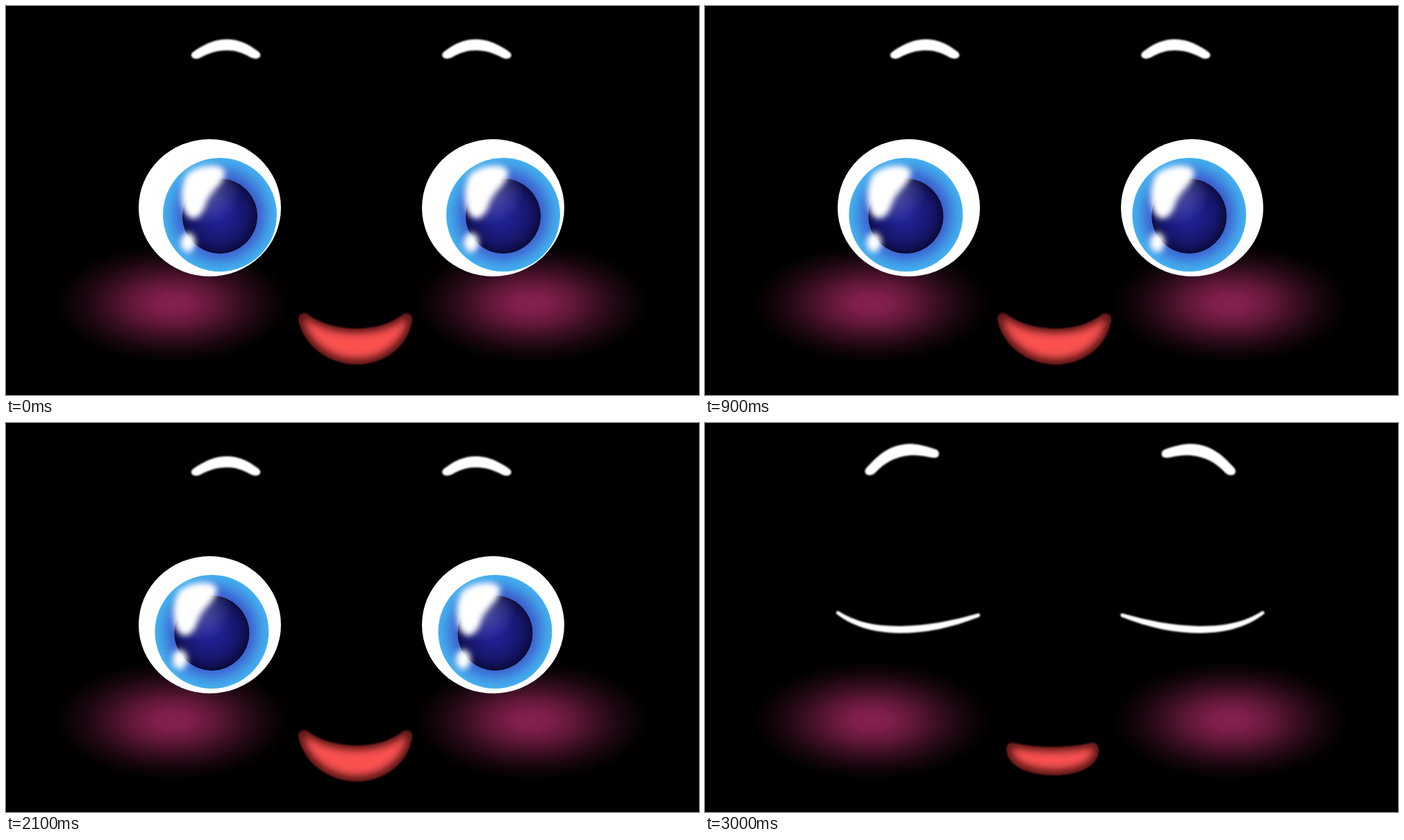
These frames come from a looping animation (998x561 px, 3.1 s). An HTML page:

```html
<!DOCTYPE html>
<html lang="en">
<head>
<meta charset="utf-8">
<title>Blinking face</title>
<style>
  html, body { margin: 0; width: 100%; height: 100%; overflow: hidden; background: #000; }
  svg { display: block; width: 100vw; height: 100vh; }
</style>
</head>
<body>
<svg viewBox="0 0 998 561" preserveAspectRatio="none">
  <defs>
    <radialGradient id="blush">
      <stop offset="0" stop-color="#842050"/>
      <stop offset=".15" stop-color="#7e1e4b"/>
      <stop offset=".35" stop-color="#611739"/>
      <stop offset=".55" stop-color="#3a0e22"/>
      <stop offset=".75" stop-color="#19060f"/>
      <stop offset=".9" stop-color="#080205"/>
      <stop offset="1" stop-color="#000"/>
    </radialGradient>
    <radialGradient id="iris">
      <stop offset=".6" stop-color="#3a55c8"/>
      <stop offset=".72" stop-color="#3d70d6"/>
      <stop offset=".88" stop-color="#419be6"/>
      <stop offset="1" stop-color="#43b0f0"/>
    </radialGradient>
    <radialGradient id="pupil" cx=".48" cy=".48" r=".54">
      <stop offset="0" stop-color="#20229a"/>
      <stop offset=".35" stop-color="#1c1e88"/>
      <stop offset=".7" stop-color="#15166a"/>
      <stop offset=".92" stop-color="#0d0d48"/>
      <stop offset="1" stop-color="#080830"/>
    </radialGradient>
    <radialGradient id="sheen">
      <stop offset="0" stop-color="#fff" stop-opacity=".26"/>
      <stop offset="1" stop-color="#fff" stop-opacity="0"/>
    </radialGradient>
    <filter id="soft" x="-20%" y="-40%" width="140%" height="180%"><feGaussianBlur stdDeviation=".8"/></filter>
    <filter id="glow" x="-40%" y="-40%" width="180%" height="180%"><feGaussianBlur stdDeviation="4"/></filter>
    <filter id="shade" x="-20%" y="-30%" width="140%" height="160%"><feGaussianBlur stdDeviation="6"/></filter>
    <clipPath id="lips"><path class="mouth"/></clipPath>
    <clipPath id="disc"><circle cx="308" cy="303" r="54"/></clipPath>

    <g id="ball">
      <ellipse cx="293.5" cy="291" rx="102.5" ry="99" fill="#fff"/>
      <g id="gaze">
        <circle cx="308" cy="301" r="82" fill="url(#iris)"/>
        <circle cx="308" cy="303" r="53.5" fill="url(#pupil)" stroke="#07071f"/>
        <circle cx="290" cy="268" r="48" fill="url(#sheen)" clip-path="url(#disc)"/>
        <path filter="url(#glow)" fill="#fff" d="M261 242C278 227 312 226 315 239C316 255 296 265 289 282C284 300 276 308 267 306C252 302 247 264 261 242Z"/>
        <ellipse filter="url(#glow)" cx="262" cy="341" rx="10.5" ry="14" fill="#fff"/>
      </g>
    </g>
    <g id="lines" fill="#fff" filter="url(#soft)">
      <path id="brow"/>
      <path id="lid" d="M189 275C188 271 192 270 195 273C220 288 247 293 282 293C322 292 356 285 392 275C396 273 398 278 394 280C355 295 320 303 280 303C240 302 212 293 189 275Z"/>
    </g>
  </defs>

  <rect width="998" height="561"/>
  <ellipse cx="240" cy="429" rx="172" ry="87" fill="url(#blush)"/>
  <ellipse cx="757" cy="429" rx="172" ry="87" fill="url(#blush)"/>
  <g id="eyes">
    <use href="#ball"/>
    <use href="#ball" x="408"/>
  </g>
  <use href="#lines"/>
  <use href="#lines" transform="translate(994.5) scale(-1 1)"/>
  <g filter="url(#soft)">
    <g clip-path="url(#lips)">
      <path class="mouth" fill="#fa5150"/>
      <path class="mouth" fill="none" stroke="#200404" stroke-opacity=".8" stroke-width="14" filter="url(#shade)" transform="translate(0 -1)"/>
    </g>
  </g>
</svg>
<script>
  const STEP = 100, COUNT = 31, FAR = 13, BACK = 27, SWEEP = 27;
  const $ = id => document.getElementById(id);
  const mouths = document.querySelectorAll('.mouth');

  const browOpen = 'M267 72C266 68 270 66 274 63C290 53 303 48 318 48C334 48 348 54 361 64C366 67 368 71 365 74C362 77 356 76 352 74C340 67 330 64 318 64C304 64 292 68 281 74C276 77 268 77 267 72Z';
  const browShut = 'M231 72C229 68 232 65 236 61C252 43 270 30 297 30C311 31 321 34 332 38C338 40 338 46 335 49C332 51 326 50 322 49C312 47 303 46 293 47C274 49 259 57 246 71C242 76 233 77 231 72Z';
  const mouthOpen = 'M421 452C421 444 429 440 435 445C455 459 480 465 505 465C530 465 552 459 570 446C577 440 586 444 585 453C580 490 545 517 505 517C465 517 428 490 421 452Z';
  const mouthShut = 'M434 472C434 462 440 459 447 462C464 465 480 467 500 467C520 467 537 465 553 462C560 459 567 462 567 473C566 495 538 508 504 508C468 508 437 497 434 472Z';

  // Blend two paths that share the same commands.
  function mix(a, b, p) {
    const to = b.match(/\d+/g);
    let i = 0;
    return a.replace(/\d+/g, n => +n + (to[i++] - n) * p);
  }

  function gazeAt(k) {
    if (k <= FAR) return -SWEEP * k / FAR;
    return -SWEEP * Math.max(0, BACK - k) / (BACK - FAR);
  }

  function draw(ms) {
    const k = Math.floor(ms / STEP) % COUNT;
    const shut = Math.max(0, (k - BACK) / (COUNT - 1 - BACK));
    $('gaze').setAttribute('transform', `translate(${gazeAt(k)})`);
    $('eyes').setAttribute('transform', `translate(0 ${295 * shut}) scale(1 ${1 - shut})`);
    $('eyes').style.display = shut < 1 ? '' : 'none';
    $('lid').style.display = shut < 1 ? 'none' : '';
    $('brow').setAttribute('d', mix(browOpen, browShut, shut));
    const d = mix(mouthOpen, mouthShut, shut);
    mouths.forEach(m => m.setAttribute('d', d));
  }

  const start = performance.now();
  function tick() {
    draw(performance.now() - start);
    requestAnimationFrame(tick);
  }
  tick();
</script>
</body>
</html>
```
